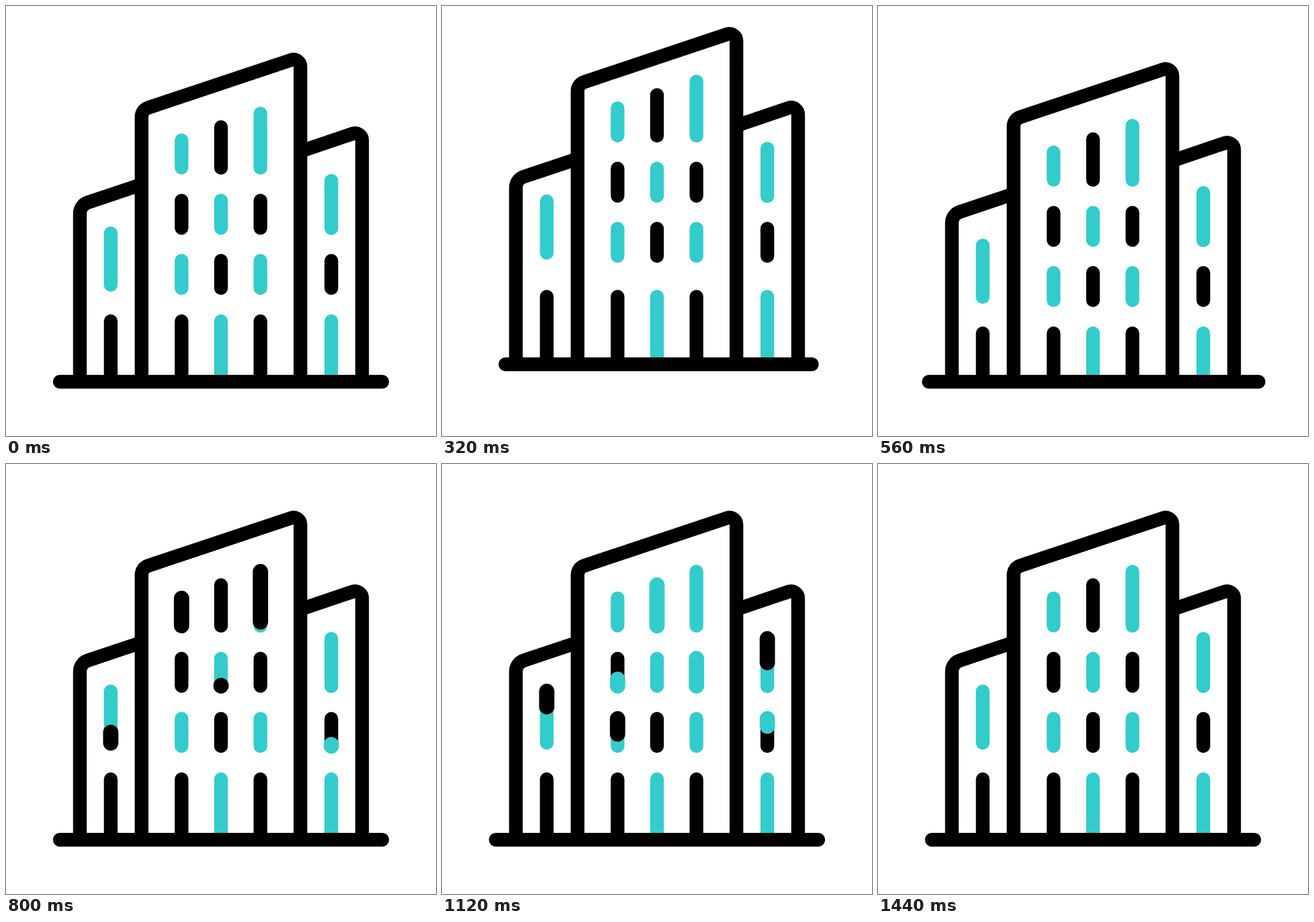
Write an HTML page without scripts that moves like this. It is 640x640 px and loops after 1.48 s.

```html
<!DOCTYPE html>
<html lang="en">
<head>
<meta charset="utf-8">
<title>City buildings</title>
<style>
  @property --f { syntax: "<number>"; inherits: true; initial-value: 0; }
  @keyframes tick { from { --f: 0; } to { --f: 37; } }

  html, body { margin: 0; width: 100%; height: 100%; overflow: hidden; background: #fff; }
  svg { display: block; width: 100%; height: 100%; animation: tick 1480ms steps(37) -3ms infinite; }

  /* --air: 0 on the ground, 1 at the top of the jump; --squash: 1 at the landing */
  svg * {
    --p1: clamp(0, (var(--f) - 2) / 5, 1);
    --p2: clamp(0, (var(--f) - 7) / 5, 1);
    --p3: clamp(0, (var(--f) - 12) / 4, 1);
    --up: (var(--p1) * var(--p1) * (3 - 2 * var(--p1)));
    --down: (var(--p2) * var(--p2) * (3 - 2 * var(--p2)));
    --back: (var(--p3) * var(--p3) * (3 - 2 * var(--p3)));
    --air: (var(--up) - var(--down));
    --squash: (var(--down) - var(--back));
  }
  .walls { fill: none; stroke: #000; stroke-width: 20.4; transform: translateY(calc(1px * (28 * var(--squash) - 46 * var(--air)))); }
  .windows { transform: translateY(calc(1px * (36 * var(--squash) - 57.5 * var(--air)))); }
  .doors { transform: translateY(calc(1px * (36 * var(--squash) - 45 * var(--air)))); }
  .ground { transform: translateY(calc(-29px * var(--air))); }
  .slab {
    x: calc(1px * (69.8 + 17 * var(--air) - 9 * var(--squash)));
    width: calc(1px * (500.4 - 29 * var(--air) + 22 * var(--squash)));
  }
  .teal { fill: #3cc; }
  .pane rect, .doors rect { width: 20.4px; rx: 10.2px; }

  /* A stroke that draws itself from frame --a and wipes away from frame --b */
  .wipe rect {
    --n: 5;
    --q1: clamp(0, (var(--f) - var(--a)) / var(--n), 1);
    --q2: clamp(0, (var(--f) - var(--b)) / var(--n), 1);
    --end: (var(--q1) * var(--q1) * (3 - 2 * var(--q1)));
    --start: (var(--q2) * var(--q2) * (3 - 2 * var(--q2)));
    --from: (1 - var(--end));
    width: 22.8px;
    rx: 11.4px;
    y: calc(1px * (var(--t) - 11.4 + var(--l) * var(--from)));
    height: calc(1px * (22.8 + var(--l) * (var(--end) - var(--start))));
    opacity: calc(clamp(0, var(--end) * 100000, 1) * clamp(0, (1 - var(--start)) * 100000, 1));
  }
  .wipe .fall { --from: var(--start); }
</style>
</head>
<body>
<svg viewBox="0 0 640 640">
  <g class="walls">
    <path d="M110 700V308.6A17 17 0 0 1 121.6 292.5L201.8 265.7"/>
    <path d="M438.2 216.4L516.2 190A10.5 10.5 0 0 1 530 200V700"/>
    <path d="M201.8 700V164.8A14 14 0 0 1 211.4 151.5L424.4 80.3A10.5 10.5 0 0 1 438.2 90.3V700"/>
  </g>

  <g class="windows">
    <g class="pane">
      <rect x="309.8" y="170" height="81"/>
      <rect x="251.1" y="279.5" height="61"/>
      <rect x="368.5" y="279.5" height="61"/>
      <rect x="309.8" y="369" height="61"/>
      <rect x="474" y="369" height="61"/>
    </g>
    <g class="pane teal">
      <rect x="145.7" y="328.3" height="97"/>
      <rect x="251.1" y="189.8" height="61"/>
      <rect x="368.5" y="150" height="101"/>
      <rect x="309.8" y="279.5" height="61"/>
      <rect x="251.1" y="369" height="61"/>
      <rect x="368.5" y="369" height="61"/>
      <rect x="474" y="250" height="91"/>
    </g>
    <g class="wipe">
      <rect x="249.9" style="--t:200;--l:40.6;--a:16;--b:21;--n:4"/>
      <rect x="367.3" class="fall" style="--t:160.2;--l:80.6;--a:16;--b:21.5;--n:4.8"/>
      <rect x="308.6" style="--t:289.7;--l:40.6;--a:19.7;--b:23.8;--n:4"/>
      <rect x="144.5" style="--t:338.5;--l:76.6;--a:18.55;--b:24.8"/>
      <rect x="249.9" style="--t:379.2;--l:40.6;--a:20.5;--b:25.7"/>
      <rect x="472.8" style="--t:260.2;--l:70.6;--a:20.4;--b:25.5"/>
    </g>
    <g class="wipe teal">
      <rect x="472.8" style="--t:379.2;--l:40.6;--a:19.3;--b:24.7"/>
      <rect x="308.6" style="--t:180.2;--l:60.6;--a:22;--b:28.5"/>
      <rect x="367.3" style="--t:289.7;--l:40.6;--a:22.5;--b:29"/>
      <rect x="249.9" style="--t:289.7;--l:40.6;--a:26.4;--b:31"/>
    </g>
  </g>

  <g class="doors">
    <rect x="145.7" y="459" height="220"/>
    <rect x="251.1" y="459" height="220"/>
    <rect x="368.5" y="459" height="220"/>
    <g class="teal">
      <rect x="309.8" y="459" height="220"/>
      <rect x="474" y="459" height="220"/>
    </g>
  </g>

  <g class="ground">
    <rect y="559" width="640" height="200" fill="#fff"/>
    <rect class="slab" y="549" height="20.5" rx="10.25"/>
  </g>
</svg>
</body>
</html>
```
